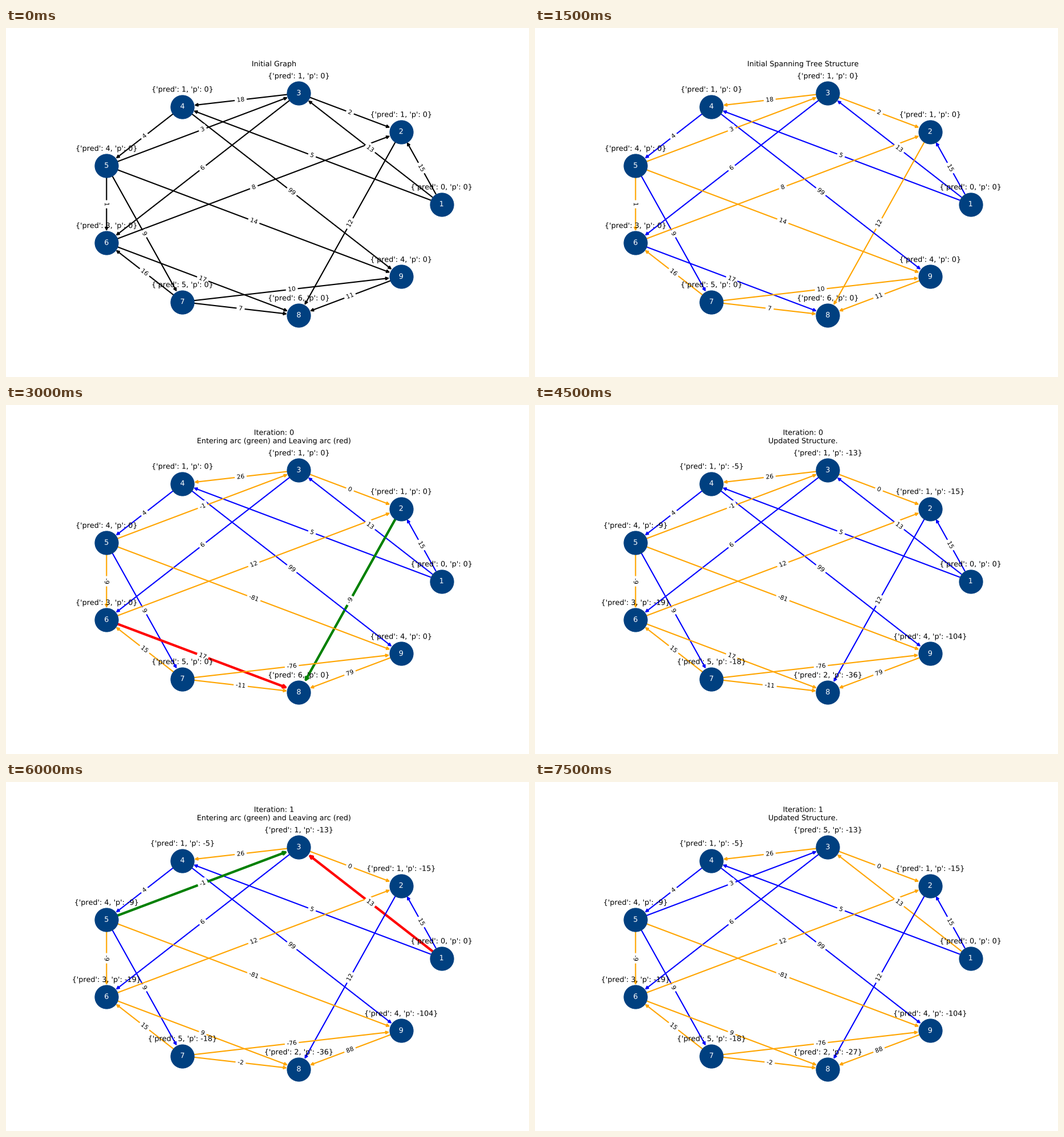
A matplotlib script that plays this animation: 917x611 px, repeating every 8000 ms.

```python
import numpy as np
import matplotlib.pyplot as plt
from matplotlib.animation import FuncAnimation
from matplotlib.patches import FancyArrowPatch
from matplotlib.patheffects import Normal

plt.rcParams.update({
    "font.family": "DejaVu Sans",
    "text.hinting": "none",
    "text.kerning_factor": 6,    # no kerning
    "path.effects": [Normal()],  # text and discs as paths, off the pixel grid
})

W, H, DPI = 917, 611, 76.4
NODE_SIZE = 1500
NODE_COLOR = "#004080"
LABEL_RISE = 0.15
MARGIN = 0.105  # share of the data range added on each side

NODES = range(1, 10)
POS = {n: (np.cos(a), np.sin(a))
       for n, a in zip(NODES, np.arange(9) * 2 * np.pi / 9)}

# Arcs listed by rising cost: 1, 2, 3, ... with one outlier at the end.
ARCS = "56 32 53 45 14 36 78 62 57 79 98 28 13 59 12 76 68 34 49".split()
COSTS = {(int(a), int(b)): rank for rank, (a, b) in enumerate(ARCS, 1)}
COSTS[4, 9] = 99
COSTS = dict(sorted(COSTS.items()))
PRED = dict(zip(NODES, map(int, "011143564")))


def tree_of(pred):
    return {(p, n) for n, p in pred.items() if p}


def price(n, pred):
    """Minus the cost of the tree path from the root to node n."""
    p = pred[n]
    return price(p, pred) - COSTS[p, n] if p else 0


def reduced_costs(prices, tree):
    return {(a, b): c if (a, b) in tree else c - prices[a] + prices[b]
            for (a, b), c in COSTS.items()}


def phase(title, pred, prices, costs, bold=None, plain=False):
    return dict(title=title, tree=tree_of(pred), pred=pred, prices=prices,
                costs=costs, bold=bold or {}, plain=plain)


def simplex(iterations):
    pred, prices = PRED, dict.fromkeys(NODES, 0)
    yield phase("Initial Graph", pred, prices, COSTS, plain=True)
    yield phase("Initial Spanning Tree Structure", pred, prices, COSTS)
    for k in range(iterations):
        head = f"Iteration: {k}\n"
        new_prices = {n: price(n, pred) for n in NODES}
        costs = reduced_costs(new_prices, tree_of(pred))
        enter = next(e for e, c in costs.items()
                     if c < 0 and e not in tree_of(pred))
        leave = (pred[enter[1]], enter[1])
        yield phase(head + "Entering arc (green) and Leaving arc (red)",
                    pred, prices, costs, {enter: "green", leave: "red"})
        pred = {**pred, enter[1]: enter[0]}
        prices = new_prices
        yield phase(head + "Updated Structure.", pred, prices,
                    {**costs, enter: COSTS[enter]})


PHASES = list(simplex(2))
FRAMES_PER_PHASE = 3

# The tiny excess keeps the pixel size from being rounded down.
fig = plt.figure(figsize=((W + 0.01) / DPI, (H + 0.01) / DPI), dpi=DPI,
                 facecolor="white")
ax = fig.add_axes([0.125, 0.11, 0.775, 0.77])


def limits(values):
    lo, hi = min(values), max(values)
    pad = MARGIN * (hi - lo)
    return lo - pad, hi + pad


def arc_color(arc, ph):
    if ph["plain"]:
        return "black"
    return ph["bold"].get(arc, "blue" if arc in ph["tree"] else "orange")


def draw_arc(arc, ph):
    gap = np.sqrt(NODE_SIZE) / 2
    ax.add_patch(FancyArrowPatch(
        *(POS[n] for n in arc), arrowstyle="-|>", mutation_scale=10,
        shrinkA=gap, shrinkB=gap, color=arc_color(arc, ph),
        linewidth=4 if arc in ph["bold"] else 2, zorder=1))


def draw_cost(arc, cost):
    a, b = (np.array(POS[n]) for n in arc)
    dx, dy = ax.transData.transform(b) - ax.transData.transform(a)
    angle = round(np.degrees(np.arctan2(dy, dx)), 6)
    if abs(angle) > 90:  # keep the text upright
        angle -= np.copysign(180, angle)
    ax.text(*(a + b) / 2, str(cost), size=10, rotation=angle,
            ha="center", va="center", zorder=1.5,
            bbox=dict(boxstyle="round", ec="white", fc="white"))


def draw_node(n, ph):
    x, y = POS[n]
    info = {"pred": ph["pred"][n], "p": ph["prices"][n]}
    style = dict(size=12, ha="center", va="center")
    ax.text(x, y, str(n), color="white", **style)
    ax.text(x, y + LABEL_RISE, str(info), **style)


def draw(i):
    ph = PHASES[i // FRAMES_PER_PHASE]
    ax.clear()
    ax.axis("off")
    xs, ys = zip(*POS.values())
    ax.set_xlim(*limits(xs))
    ax.set_ylim(*limits(ys))
    ax.set_title(ph["title"], fontsize=12)
    for arc, cost in ph["costs"].items():
        draw_arc(arc, ph)
        draw_cost(arc, cost)
    ax.scatter(xs, ys, s=NODE_SIZE, c=NODE_COLOR, zorder=2)
    for n in NODES:
        draw_node(n, ph)
    return []


anim = FuncAnimation(fig, draw, frames=16, interval=500, init_func=lambda: [],
                     repeat=True, repeat_delay=0, blit=False)
plt.show()
```
